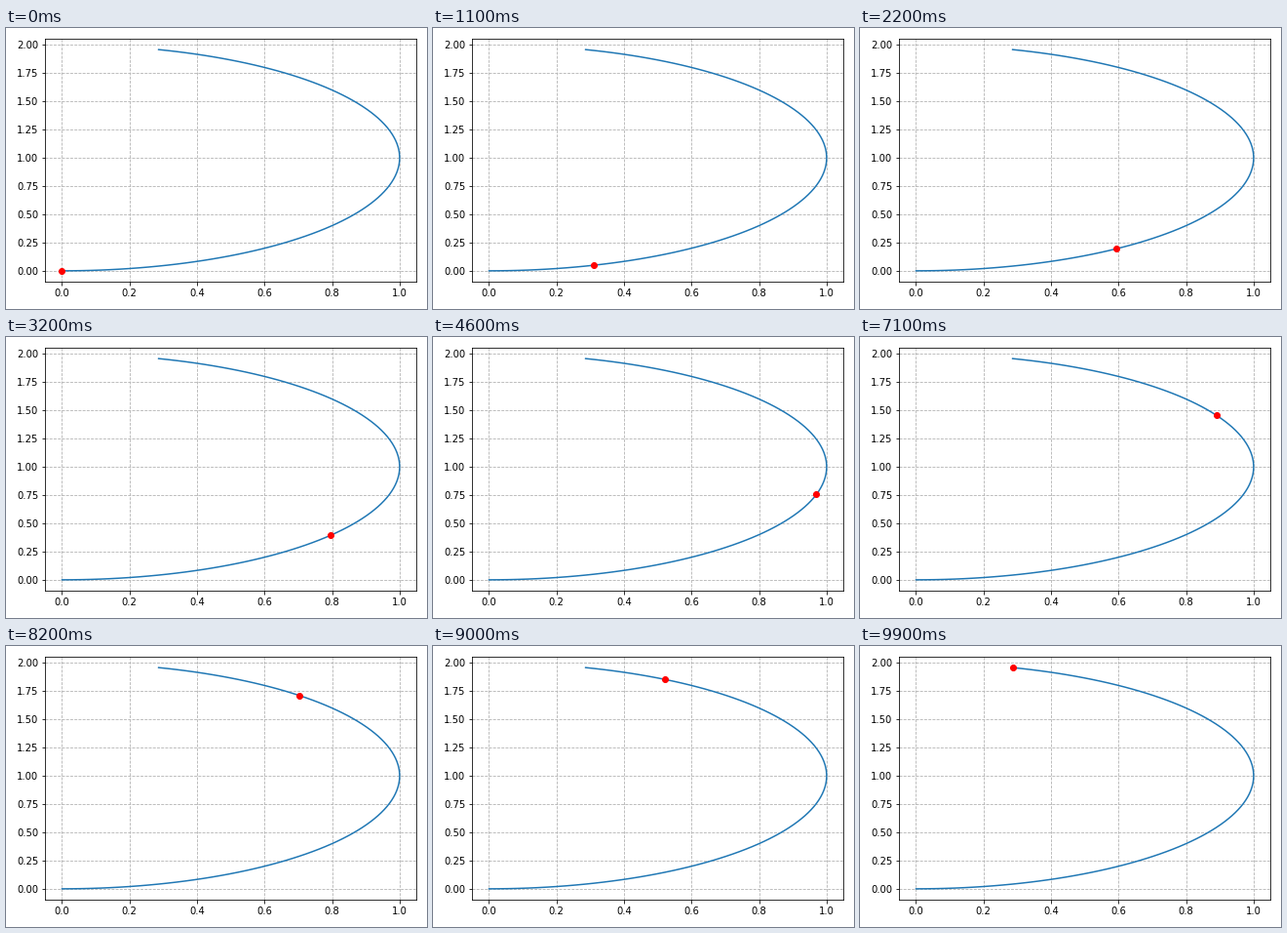
A matplotlib script that plays this animation: 432x288 px, repeating every 10000 ms.

```python
import numpy as np
import matplotlib.pyplot as plt
from matplotlib.animation import FuncAnimation

FRAMES = 100
END_ANGLE = 2.8515

plt.rcParams["font.family"] = "DejaVu Sans"

# Unit circle traced counter-clockwise from the origin at constant speed
theta = np.linspace(0, END_ANGLE, FRAMES)
x, y = np.sin(theta), 1 - np.cos(theta)

fig, ax = plt.subplots(figsize=(6, 4), dpi=72)
ax.plot(x, y, color="tab:blue", linewidth=1.5)
dot, = ax.plot(x[:1], y[:1], "ro", markersize=6)
ax.grid(linestyle="--")
fig.tight_layout()


def update(i):
    dot.set_data([x[i]], [y[i]])
    return dot,


anim = FuncAnimation(fig, update, frames=FRAMES, interval=100,
                     repeat=True, repeat_delay=0)
plt.show()
```
